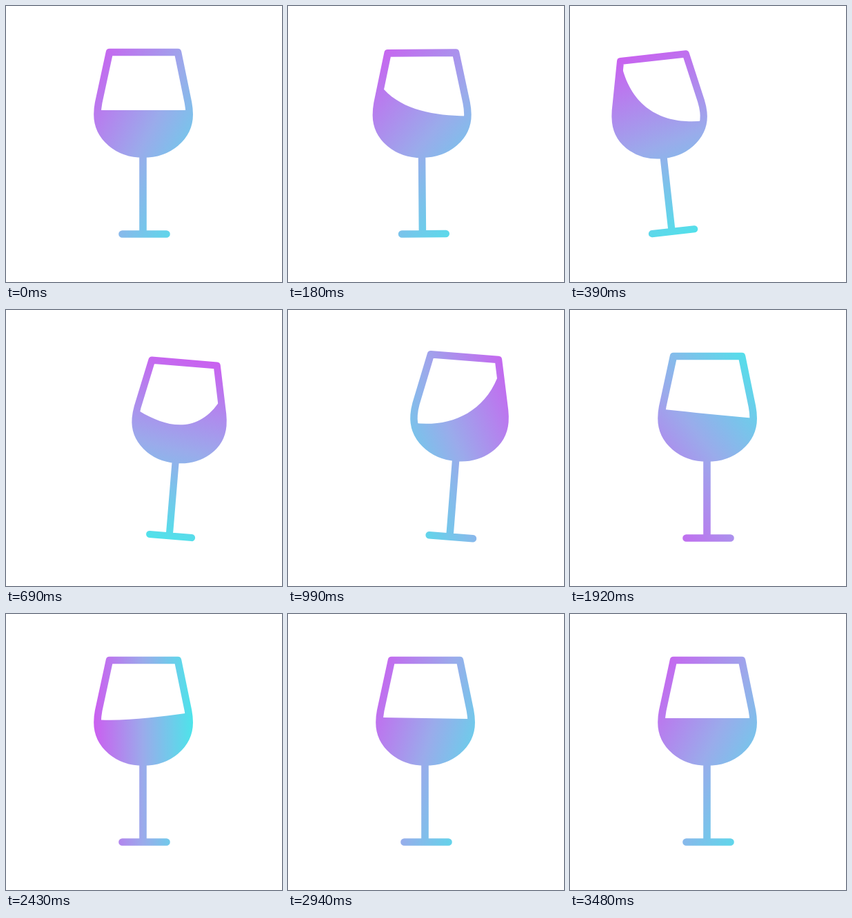
An HTML page with a canvas for the animation above (5.51 s loop, 400 by 400 pixels).

```html
<!DOCTYPE html>
<html lang="en">
<head>
<meta charset="utf-8">
<title>Wine glass</title>
<style>
  html, body { margin: 0; width: 100%; height: 100%; overflow: hidden; background: #fff; }
  canvas { display: block; width: 400px; height: 400px; }
</style>
</head>
<body>
<canvas id="stage" width="400" height="400"></canvas>
<script>
const ctx = document.getElementById('stage').getContext('2d');
const LOOP = 5510, STEP = 30;
const CX = 199, CY = 199;

// Each key: [time, value, ...]
const SHIFT = [[0, 0], [80, 8], [365, -65], [840, 65], [1205, -3], [1380, 0]];
const DIP = [[0, 0], [600, 1], [1200, 0]];
const SPIN = [[0, 45], [390, 82], [690, 94], [990, 135], [1410, 225], [2430, 360], [3480, 405]];
// Liquid surface heights: left wall, two inner controls, right wall
const SURFACE = [
  [0, 151, 151, 151, 151],
  [390, 80, 150, 170, 170],
  [690, 146, 165, 175, 124],
  [990, 169, 171, 150, 94],
  [1410, 156, 154, 148, 136],
  [1860, 144, 148, 153, 157],
  [2430, 153.5, 155, 149, 144],
  [2940, 150, 150.5, 151.5, 152],
  [3450, 151, 151, 151, 151]
];

const cubicInOut = p => p < 0.5 ? 4 * p ** 3 : 1 - 4 * (1 - p) ** 3;

function segment(keys, t) {
  let i = 0;
  while (i < keys.length - 2 && t >= keys[i + 1][0]) i++;
  const [a, b] = [keys[i][0], keys[i + 1][0]];
  return [i, Math.min(1, Math.max(0, (t - a) / (b - a)))];
}

function eased(keys, t) {
  const [i, p] = segment(keys, t);
  return keys[i][1] + (keys[i + 1][1] - keys[i][1]) * cubicInOut(p);
}

// Monotone cubic interpolation of column c
function smooth(keys, t, c = 1) {
  const [i, p] = segment(keys, t);
  const rate = k => (keys[k + 1][c] - keys[k][c]) / (keys[k + 1][0] - keys[k][0]);
  const tangent = k => {
    if (k === 0 || k === keys.length - 1) return 0;
    const a = rate(k - 1), b = rate(k);
    return a * b > 0 ? 2 * a * b / (a + b) : 0;
  };
  const h = keys[i + 1][0] - keys[i][0], q = 1 - p;
  return keys[i][c] * q * q * (1 + 2 * p) + keys[i + 1][c] * p * p * (3 - 2 * p)
    + h * (tangent(i) * p * q * q - tangent(i + 1) * p * p * q);
}

function makeBowl() {
  const p = new Path2D();
  p.moveTo(150, 67);
  p.lineTo(249, 67);
  p.lineTo(264, 140);
  p.quadraticCurveTo(265.7, 149, 265.7, 157);
  p.bezierCurveTo(265.7, 190, 236, 214.5, 199, 214.5);
  p.bezierCurveTo(162, 214.5, 132.5, 190, 132.5, 157);
  p.quadraticCurveTo(132.5, 149, 134.2, 140);
  p.closePath();
  return p;
}

function makeStand() {
  const p = new Path2D();
  p.moveTo(198.5, 214);
  p.lineTo(198.5, 330);
  p.moveTo(168.5, 330.5);
  p.lineTo(232.5, 330.5);
  return p;
}

const bowl = makeBowl(), stand = makeStand();

function drawLiquid(t) {
  const [l, c1, c2, r] = [1, 2, 3, 4].map(c => smooth(SURFACE, t, c));
  const wall = y => 152 - (y - 80) * 0.205;
  const xl = wall(l), xr = 398.5 - wall(r);
  ctx.save();
  ctx.clip(bowl);
  ctx.beginPath();
  ctx.moveTo(120, l);
  ctx.lineTo(xl, l);
  ctx.bezierCurveTo(178 - 0.2 * (151 - l), c1, 220 + 0.2 * (151 - r), c2, xr, r);
  ctx.lineTo(280, r);
  ctx.lineTo(280, 225);
  ctx.lineTo(120, 225);
  ctx.fill();
  ctx.restore();
}

function tint(t) {
  const a = smooth(SPIN, t) * Math.PI / 180;
  const reach = Math.abs(Math.cos(a)) + Math.abs(Math.sin(a));
  const x = Math.cos(a) * reach, y = Math.sin(a) * reach;
  const g = ctx.createLinearGradient(-x, -y, x, y);
  g.addColorStop(0, '#cb5ef0');
  g.addColorStop(0.5, '#9aabeb');
  g.addColorStop(1, '#4de4ea');
  ctx.globalCompositeOperation = 'source-in';
  ctx.translate(CX, CY);
  ctx.scale(72, 137);
  ctx.fillStyle = g;
  ctx.fillRect(-9, -9, 18, 18);
}

function draw(t) {
  const x = eased(SHIFT, t), dip = eased(DIP, t);
  const size = 1 - 0.045 * dip;

  ctx.clearRect(0, 0, 400, 400);
  ctx.save();
  ctx.translate(CX + x, CY + 4.5 * dip - 0.026 * Math.abs(x));
  ctx.rotate(x * 0.098 * Math.PI / 180);
  ctx.scale(size, size);
  ctx.translate(-CX, -CY);

  ctx.fillStyle = ctx.strokeStyle = '#000';
  ctx.lineWidth = 10.6;
  ctx.lineCap = ctx.lineJoin = 'round';
  drawLiquid(t);
  ctx.stroke(bowl);
  ctx.stroke(stand);
  tint(t);
  ctx.restore();

  ctx.save();
  ctx.globalCompositeOperation = 'destination-over';
  ctx.fillStyle = '#fff';
  ctx.fillRect(0, 0, 400, 400);
  ctx.restore();
}

const start = performance.now();
function tick() {
  const t = (performance.now() - start) % LOOP;
  draw(Math.floor(t / STEP) * STEP);
  requestAnimationFrame(tick);
}
tick();
</script>
</body>
</html>
```
